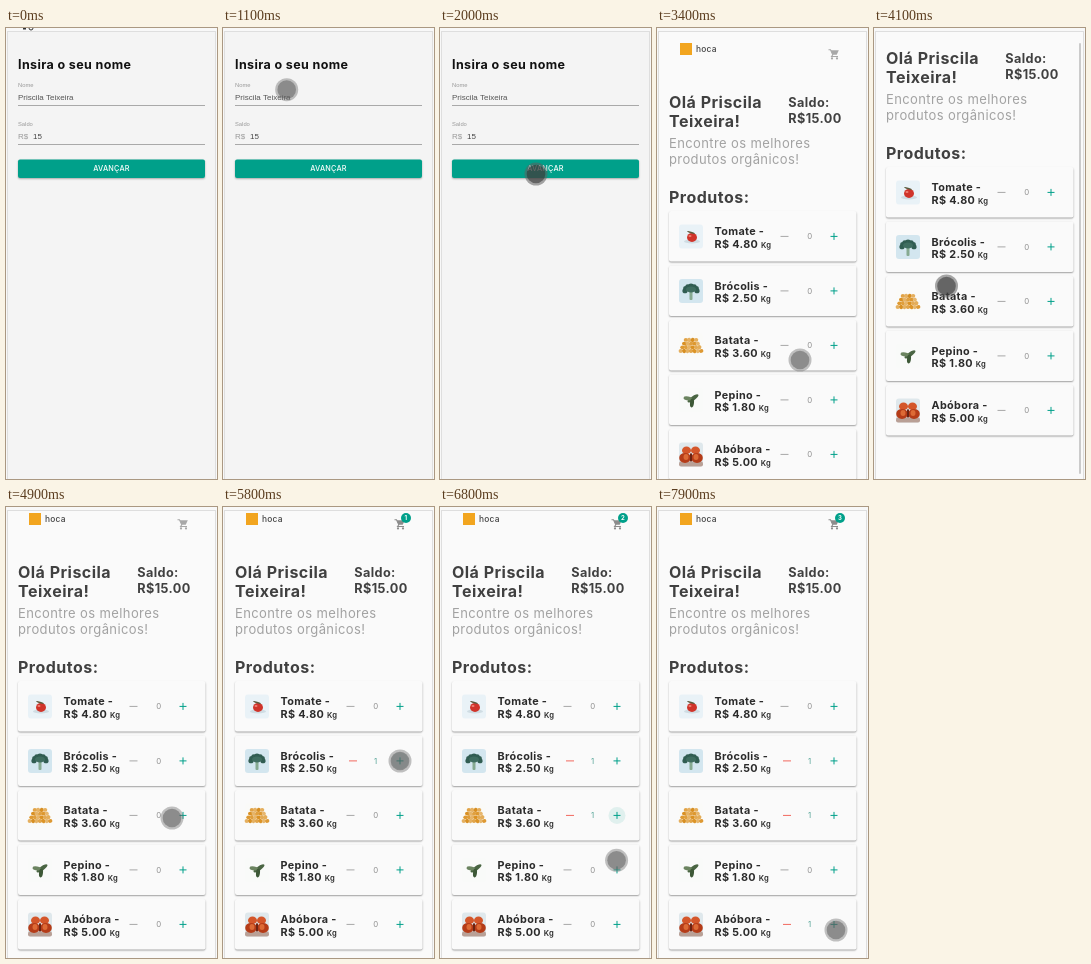
Write an HTML page with a canvas that moves like this. It is 211 by 451 pixels and loops after 8 s.

```html
<!DOCTYPE html>
<html lang="pt">
<head>
<meta charset="utf-8">
<title>Produtos</title>
<style>
html, body { margin: 0; width: 100%; height: 100%; overflow: hidden; background: #f8f8f8; }
canvas { display: block; width: 211px; height: 451px; }
</style>
</head>
<body>
<canvas id="stage"></canvas>
<script>
const W = 211, H = 451, LOOP = 8000, STEP = 100;
const SHOP_AT = 2600, DRAG_FROM = 3800, DRAG_TURN = 4400, DRAG_TO = 4600;
const TEAL = '#00a08a', RED = '#f2695f', DARK = '#404040', INK = '#2b2b2b', PALE = '#a2a2a2';
const SANS = 'Inter, sans-serif', FIELD = '"Liberation Sans", Arial, sans-serif';
const canvas = document.getElementById('stage');
const ctx = canvas.getContext('2d');
const ratio = window.devicePixelRatio || 1;
canvas.width = W * ratio;
canvas.height = H * ratio;

const products = [
  { name: 'Tomate', price: '4.80', art: tomato },
  { name: 'Brócolis', price: '2.50', art: broccoli, added: 5700 },
  { name: 'Batata', price: '3.60', art: potatoes, added: 6600 },
  { name: 'Pepino', price: '1.80', art: cucumber },
  { name: 'Abóbora', price: '5.00', art: pumpkins, added: 7300 }
];

// Eased pointer moves: start, end, and where it comes to rest
const moves = [
  { from: 200, to: 300, x: 80, y: 95 },
  { from: 900, to: 1200, x: 58, y: 50 },
  { from: 1400, to: 2000, x: 96, y: 146 },
  { from: 2800, to: 3400, x: 143, y: 332 },
  { from: 3400, to: 3600, x: 90, y: 429 },
  { from: DRAG_FROM, to: DRAG_TURN, x: 55, y: 87 },
  { from: DRAG_TURN, to: DRAG_TO, x: 56, y: 122 },
  { from: DRAG_TO, to: 4900, x: 166, y: 311 },
  { from: 5000, to: 5500, x: 177, y: 254 },
  { from: 5800, to: 6400, x: 175, y: 308 },
  { from: 6500, to: 7200, x: 179, y: 423 }
];

const clamp = (v, lo, hi) => Math.min(hi, Math.max(lo, v));
const between = (t, a, b) => t >= a && t < b;

function pointerAt(t) {
  let x = 107, y = 131;
  for (const m of moves) {
    const p = clamp((t - m.from) / (m.to - m.from), 0, 1);
    const k = p * p * (3 - 2 * p);
    x += (m.x - x) * k;
    y += (m.y - y) * k;
  }
  return { x, y };
}

// The page follows the finger, up to the end of its content
function scrollAt(t) {
  if (t < DRAG_FROM) return 0;
  const { y } = pointerAt(Math.min(t, DRAG_TO));
  return t < DRAG_TURN ? clamp(429 - y, 0, 44) : 44 - (y - 87);
}

function isPressed(t) {
  return between(t, 2000, 2300) || between(t, DRAG_FROM, DRAG_TO) ||
    products.some(p => between(t, p.added - 200, p.added));
}

function text(s, x, y, size, color, weight = 400, align = 'left', family = SANS) {
  ctx.font = `${weight} ${size}px ${family}`;
  ctx.letterSpacing = family === SANS ? `${size * 0.03}px` : '0px';
  ctx.fillStyle = color;
  ctx.textAlign = align;
  ctx.fillText(s, x, y);
}

function rect(x, y, w, h, color) {
  ctx.fillStyle = color;
  ctx.fillRect(x, y, w, h);
}

function round(x, y, w, h, r, color) {
  ctx.fillStyle = color;
  ctx.beginPath();
  ctx.roundRect(x, y, w, h, r);
  ctx.fill();
}

function oval(x, y, rx, ry, color, turn = 0) {
  ctx.fillStyle = color;
  ctx.beginPath();
  ctx.ellipse(x, y, rx, ry, turn, 0, 7);
  ctx.fill();
}

function withShadow(color, blur, draw) {
  ctx.save();
  ctx.shadowColor = color;
  ctx.shadowBlur = blur * ratio;
  ctx.shadowOffsetY = ratio;
  draw();
  ctx.restore();
}

// Thumbnails, drawn around their own centre
function backdrop(color) {
  round(-12, -12, 24, 24, 3, color);
}

function tomato() {
  backdrop('#e9f2f7');
  oval(1, 5, 8, 2, '#cfdce3');
  oval(1, 1, 5, 4.5, '#d0342a');
  oval(-1, -0.5, 1.5, 1, '#ef8275');
  oval(0, -4, 4, 0.8, '#5b5a3c', 0.3);
}

function broccoli() {
  backdrop('#d3e6ef');
  round(-1.5, 0, 3, 9, 1, '#86aa91');
  for (let i = 0; i < 7; i++) {
    const a = Math.PI * (1 + i / 6);
    oval(6 * Math.cos(a), 5 * Math.sin(a), 2.6, 2.4, '#315d52');
  }
  oval(0, -1.5, 5, 3, '#3f6d60');
}

function potatoes() {
  backdrop('#fafaf8');
  for (let row = 0; row < 4; row++) {
    const n = 4 + row;
    for (let i = 0; i < n; i++) {
      const light = 58 + 9 * Math.sin(row * 5 + i * 2.3);
      oval((i - (n - 1) / 2) * 3.4, -5.5 + row * 3.7, 2.2, 1.9, `hsl(36 72% ${light}%)`, i);
    }
  }
}

function cucumber() {
  backdrop('#f9faf9');
  oval(2, -1.5, 6.5, 2.1, '#4a6543', -0.6);
  oval(-3, -1.5, 4.5, 2, '#6b8460', 0.15);
  oval(1, 3, 2, 4.5, '#3d5837', 0.1);
}

function pumpkins() {
  backdrop('#dfe8ec');
  round(-12, 7, 24, 5, 2, '#b9a096');
  for (const side of [-1, 1]) {
    oval(side * 4.5, -4, 4.5, 3.8, '#d4562a');
    oval(side * 6, 3.5, 5.8, 5, '#b53c18');
    oval(side * 5, 2.5, 2.5, 3, '#dd6a35');
  }
  rect(-1, -1, 2, 8, '#6d2413');
}

function field(label, y) {
  text(label, 12, y, 5.8, '#999', 400, 'left', FIELD);
  rect(12, y + 18, 187, 1, '#a9a9a9');
}

function drawForm() {
  text('Insira o seu nome', 12, 41, 12.5, '#111', 700);
  field('Nome', 59);
  text('Priscila Teixeira', 12, 72, 8, '#555', 400, 'left', FIELD);
  field('Saldo', 98);
  text('R$', 12, 111, 8, '#999', 400, 'left', FIELD);
  text('15', 27, 111, 8, '#444', 400, 'left', FIELD);
  withShadow('rgba(0,0,0,.3)', 2, () => round(12, 131.5, 187, 18.5, 2, TEAL));
  text('AVANÇAR', 105.5, 143.4, 7.3, '#fff', 500, 'center');
}

function line(...points) {
  ctx.beginPath();
  for (const [x, y] of points) ctx.lineTo(x, y);
}

function drawCart(count) {
  const color = count ? '#8c8c8c' : '#a8a8a8';
  ctx.strokeStyle = color;
  ctx.lineWidth = 1.1;
  line([171.5, 21.7], [173.5, 21.7], [175.8, 26.8], [174.6, 28.5], [181, 28.5]);
  ctx.stroke();
  ctx.fillStyle = color;
  line([173.8, 22.3], [181.8, 22.3], [179.7, 26.8], [175.6, 26.8]);
  ctx.fill();
  oval(175, 30.4, 1.1, 1.1, color);
  oval(180, 30.4, 1.1, 1.1, color);
  if (count) {
    oval(183, 20, 5, 5, TEAL);
    text(count, 183, 22.1, 6, '#fff', 700, 'center');
  }
}

function drawCard(p, i, t) {
  const y = 208.4 + i * 54.5;
  const age = t - p.added;
  const count = age >= 0 ? 1 : 0;
  withShadow('rgba(0,0,0,.36)', 1.6, () => round(12, y - 25.5, 187.5, 50.5, 2, '#fafafa'));
  ctx.save();
  ctx.translate(34, y);
  p.art();
  ctx.restore();
  const price = 'R$ ' + p.price;
  text(p.name + ' -', 57.6, y - 1.3, 10.8, INK, 700);
  text(price, 57.6, y + 11.4, 10.8, INK, 700);
  text('Kg', 60.5 + ctx.measureText(price).width, y + 11.4, 7.6, INK, 600);
  rect(count ? 126 : 123.5, y - 0.5, 8, 1, count ? RED : '#a8a8a8');
  text(count, 152.8, y + 2.7, 7.8, count ? '#56a598' : '#8f8f8f', 400, 'center');
  if (count && age < 500) {
    const alpha = 0.1 * Math.min(1, (500 - age) / 300);
    oval(177, y, 8.5, 8.5, `rgba(0,160,138,${alpha})`);
  }
  rect(173.5, y - 0.5, 7, 1, TEAL);
  rect(176.5, y - 3.5, 1, 7, TEAL);
}

function drawShop(t) {
  const scroll = scrollAt(t);
  ctx.save();
  ctx.translate(0, -scroll);
  round(23, 15, 12, 12, 0, '#f2a51f');
  text('hoca', 39, 24, 8.4, '#444', 500);
  drawCart(products.filter(p => t >= p.added).length);
  text('Olá Priscila', 12, 80, 16, DARK, 700);
  text('Teixeira!', 12, 98.6, 16, DARK, 700);
  text('Saldo:', 131.3, 79, 12.7, DARK, 700);
  text('R$15.00', 131.3, 95, 12.7, DARK, 700);
  text('Encontre os melhores', 12, 120, 13, PALE);
  text('produtos orgânicos!', 12, 136, 13, PALE);
  text('Produtos:', 12, 175, 16, DARK, 700);
  products.forEach((p, i) => drawCard(p, i, t));
  ctx.restore();
  if (between(t, DRAG_FROM + STEP, DRAG_TO + STEP)) {
    round(205, 3 + scroll * 0.27, 2, 431, 1, '#cbcbcb');
  }
}

function drawPointer(t) {
  if (t < 200) {
    rect(17, 0, 3, 1.5, '#333');
    ctx.strokeStyle = '#333';
    ctx.lineWidth = 1;
    ctx.beginPath();
    ctx.arc(25, 0, 2, 0, Math.PI);
    ctx.stroke();
    return;
  }
  const { x, y } = pointerAt(t);
  const pressed = isPressed(t);
  oval(x, y, 11.5, 11.5, pressed ? 'rgba(95,95,95,.55)' : 'rgba(110,110,110,.42)');
  oval(x, y, 9.3, 9.3, pressed ? 'rgba(50,50,50,.55)' : 'rgba(90,90,90,.5)');
}

function draw(now) {
  const t = Math.floor((now % LOOP) / STEP) * STEP;
  const shop = t >= SHOP_AT;
  ctx.setTransform(ratio, 0, 0, ratio, 0, 0);
  rect(0, 0, W, H, '#f8f8f8');
  rect(1, 3, 209, H, '#dedede');
  rect(2, 4, 207, H, shop ? '#fafafa' : '#f4f4f4');
  ctx.save();
  ctx.beginPath();
  ctx.rect(2, 4, 207, H);
  ctx.clip();
  if (shop) drawShop(t);
  else drawForm();
  ctx.restore();
  drawPointer(t);
}

const start = performance.now();
function tick() {
  draw(performance.now() - start);
  requestAnimationFrame(tick);
}
tick();
</script>
</body>
</html>
```
